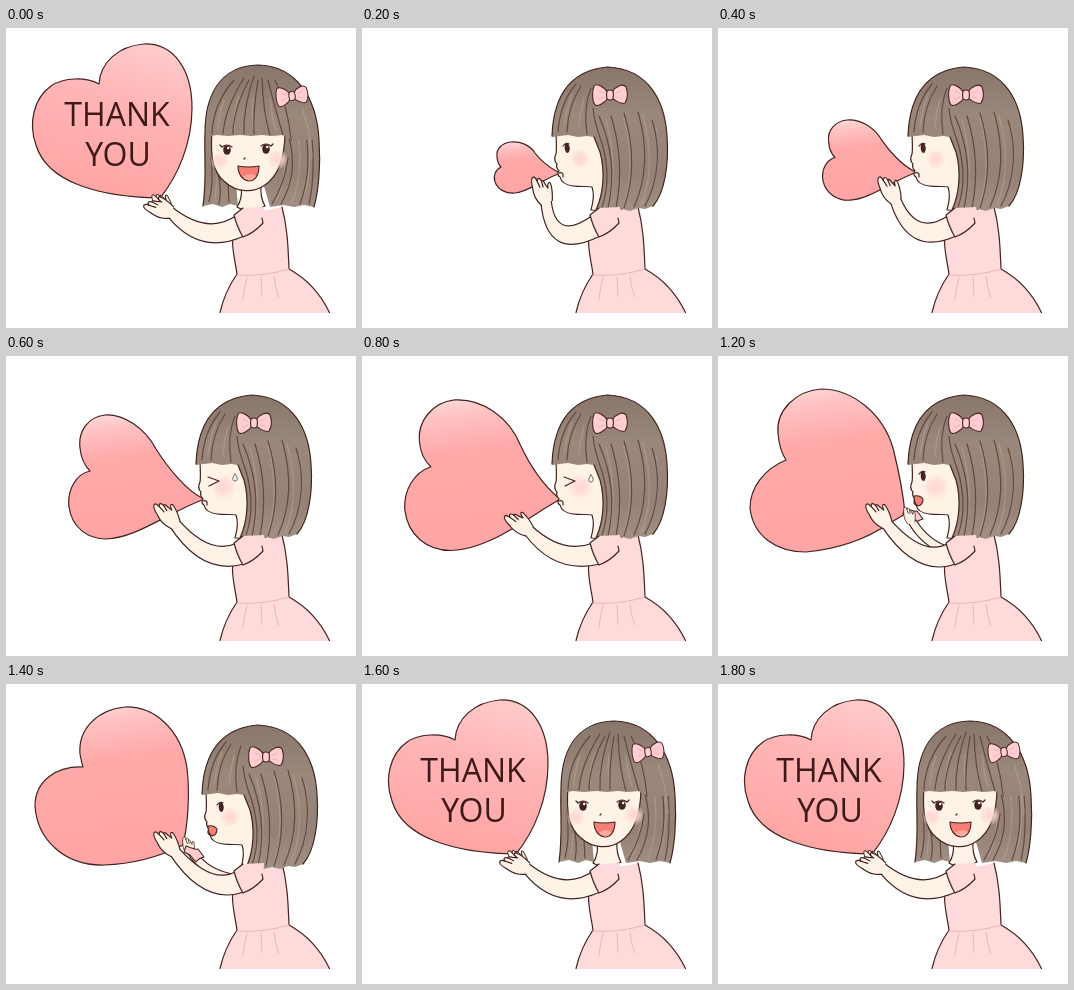
An HTML page that plays this animation: 350 px wide and 300 px high, repeating every 2000 ms.

```html
<!DOCTYPE html>
<html lang="en">
<head>
<meta charset="utf-8">
<title>Thank you</title>
<style>
html, body { margin: 0; width: 100%; height: 100%; overflow: hidden; background: #fff; }
svg { display: block; width: 350px; height: 300px; }
.pose { visibility: hidden; animation: one 2s step-end infinite; animation-delay: calc(var(--s) * 200ms - 2s); }
.pose.long { animation-name: three; }
@keyframes one { 0% { visibility: visible } 10%, 100% { visibility: hidden } }
@keyframes three { 0% { visibility: visible } 30%, 100% { visibility: hidden } }
path { stroke-linejoin: round; stroke-linecap: round; }
.ink { fill: none; stroke: #432320; stroke-width: 1.2; }
.skin { fill: #fff3e8; stroke: #432320; stroke-width: 1.2; }
.dress { fill: #ffdadb; stroke: #432320; stroke-width: 1.2; }
.bow { fill: #ffcdd2; stroke: #432320; stroke-width: 1.1; }
.hair { fill: url(#hair); }
.dark { fill: none; stroke: #64493f; stroke-width: 1.2; }
.light { fill: none; stroke: #b5a398; stroke-width: 1.6; opacity: .5; }
.fold { fill: none; stroke: #eeb4b8; stroke-width: 1; }
.eye { fill: #432320; }
.mouth { fill: #f67f74; stroke: #432320; stroke-width: 1.1; }
.drop { fill: #f4fbff; stroke: #66595a; stroke-width: .9; }
text { font: 32px "Open Sans", "Noto Sans", sans-serif; fill: #3d1a18; text-anchor: middle; }
</style>
</head>
<body>
<svg id="stage" viewBox="0 0 350 300"></svg>
<script>
const p = (cls, d) => `<path class="${cls}" d="${d}"/>`;
const move = (x, y, body) => `<g transform="translate(${x} ${y})">${body}</g>`;
const blush = (x, y, r) => `<circle cx="${x}" cy="${y}" r="${r}" fill="url(#blush)"/>`;

const mix = (a, b, t) => {
  const to = b.match(/\d+/g);
  let i = 0;
  return a.replace(/\d+/g, n => (+n + (to[i++] - n) * t).toFixed(1));
};

const small = 'M196 144C188 140 178 132 173 125C168 117 158 113 149 114C140 115 134 121 135 128C135 132 136 136 139 139C133 142 131 148 133 154C136 162 145 166 153 165C166 164 180 152 196 146';
const medium = 'M196 142C180 134 162 112 150 93C139 72 118 58 99 59C82 61 72 75 74 92C75 102 79 110 84 115C70 118 61 134 63 151C66 172 82 183 100 183C130 182 160 158 196 144';
const large = 'M197 142C183 128 172 112 162 88C150 56 120 36 90 38C65 41 49 62 51 83C52 95 57 104 63 109C44 116 34 135 35 155C38 182 58 199 85 199C125 198 160 168 197 144';
const freed = 'M187 158C185 134 181 116 175 92C165 58 135 33 103 33C77 35 58 55 60 77C61 90 64 98 68 104C46 113 32 132 32 152C35 180 58 196 88 196C120 193 150 182 172 167L187 158';
const turned = 'M177 161C182 140 184 110 181 84C175 45 148 22 119 23C90 26 72 46 74 70C75 76 76 80 77 83C50 82 29 97 29 122C31 155 58 182 98 181C128 180 155 172 177 161';
const upright = 'M154 170C172 148 186 115 186 80C186 42 168 15 138 16C112 18 94 35 93 56C80 49 58 49 45 58C28 70 22 95 30 117C41 154 92 169 154 170Z';

const heart = (d, fill = 'heart') => `<path d="${d}" fill="url(#${fill})" stroke="#432320" stroke-width="1.2"/>`;

// Hand points up from the wrist at 0,0
const hand = (x, y, turn, size = 1) => `<g transform="translate(${x} ${y}) rotate(${turn}) scale(${size})">` +
  p('skin', 'M-6 2C-9 -5 -9 -11 -7 -17C-6 -23 -4 -27 -2 -27C0 -27 0 -24 0 -22C2 -25 4 -24 4 -20C5 -21 6 -19 6 -16L7 -11C9 -17 12 -17 11 -12C10 -6 8 -2 6 2') +
  p('ink', 'M0 -22L0 -15M4 -20L3 -14') + '</g>';

// Tapered arm from the sleeve, bent towards ex,ey
const arm = (ex, ey, wx, wy, turn) => {
  const a = turn * Math.PI / 180, c = 5.5 * Math.cos(a), s = 5.5 * Math.sin(a);
  return p('skin', `M231 187Q${ex + 4} ${ey - 10} ${wx + c} ${wy + s}L${wx - c} ${wy - s}Q${ex - 4} ${ey + 10} 238 208Z`) +
    hand(wx, wy, turn);
};

const bow = p('bow', 'M-2 -2C-6 -9 -14 -12 -16 -9C-18 -4 -18 6 -15 10C-11 12 -5 7 -2 3Z') +
  p('bow', 'M2 -3C6 -9 13 -12 16 -8C18 -3 18 4 15 8C11 10 6 6 2 3Z') +
  p('bow', 'M-3 -4Q0 -6 3 -4Q4 0 3 4Q0 6 -3 4Q-4 0 -3 -4Z') +
  p('fold', 'M-6 -2L-11 -4M-6 2L-11 4M6 -2L11 -4M6 2L11 3');

const dress =
  `<path d="M231 246C222 259 217 271 214 285L324 285C315 267 303 252 283 241Z" fill="#ffdadb"/>` +
  p('ink', 'M231 246C222 259 217 271 214 284.500M283 241C303 252 315 267 323.500 284.500') +
  `<path d="M234 181L228 196C224 212 229 232 231 247Q257 249 283 241C282 215 281 198 276 179Q255 185 234 181Z" fill="#ffdadb"/>` +
  p('ink', 'M228 200C224 214 229 232 231 246M283 241C282 215 281 198 276 179') +
  p('fold', 'M231 247Q257 249 283 241M241 250Q238 260 237 271M255 249L256 268M268 248Q269 260 273 269');
const sleeve = `<path d="M237 180L228 187Q231 199 237 209Q248 205 257 195L258 179Z" fill="#ffdadb"/>` +
  p('ink', 'M237 180L228 187Q231 199 237 209Q248 205 257 195L256 190');

const sideHair =
  p('hair', 'M190 109C191 82 198 43 246 39C288 41 303 75 305 108C307 135 303 165 291 178L283 181L276 180L268 183L260 181L252 183L244 181L234 183C242 165 243 142 238 124L232 109L225 108L216 109L206 107L198 108Z') +
  p('light', 'M244 92C252 120 253 150 247 178M262 90C270 120 270 150 262 179M281 88C290 120 290 150 279 177M210 66Q204 82 202 98M222 70Q218 85 217 99M294 100Q298 130 292 155') +
  p('dark', 'M231 80C232 92 235 102 240 115C247 140 246 162 240 179M237 88C250 118 253 150 246 180M249 88C259 120 260 150 254 180M262 85C272 118 273 148 262 180M276 84C285 115 286 148 272 179M290 92C299 118 297 152 283 178M219 58Q206 78 205 104M229 60Q221 80 225 106M214 56Q198 75 196 104') +
  p('ink', 'M190 108C191 82 198 43 246 39C288 41 303 75 305 108C307 135 303 165 291 178M232 109L238 124C243 142 242 165 234 182');
const sideFace = p('skin', 'M194 102C194 112 195 120 194 126C192 130 192 133 195 136C194 139 195 141 197 143C195 146 196 148 198 149C199 154 204 157 211 158C219 159 226 158 230 159C233 167 231 175 229 182L260 184L256 150L240 100Z');

const openEye = p('eye', 'M204 115C208 116 209 122 206 125C202 125 202 117 204 115Z') + p('ink', 'M201 118Q204 114 207 116');
const squint = p('ink', 'M202 121L213 125L203 130');
const pucker = p('ink', 'M197 145Q200 144 201 146L201 149');
const smile = p('mouth', 'M196 140Q202 139 205 143Q205 149 200 150Q196 148 196 140Z');
const drop = (x, y) => p('drop', `M${x} ${y - 4}c3 4 3 7 0 7c-3 0 -3 -3 0 -7Z`);

const side = (n, shape, face, arms, o = {}) => `<g class="pose" style="--s:${n}">` +
  heart(shape) + (o.back || '') +
  move(o.dx || 0, o.dy || 0, sideFace + blush(218, 131, o.cheek || 11) + face) + dress +
  move(o.dx || 0, o.dy || 0, sideHair) +
  move(o.bx || 248, o.by || 67, bow) + (o.sweat || '') + arms + sleeve + '</g>';

// Far arm holding the neck of the balloon
const backArm = (x, y) =>
  p('skin', `M${x - 3} ${y}Q${x + 9} ${y + 23} 232 202L232 191Q${x + 18} ${y + 19} ${x + 5} ${y - 2}Z`) +
  hand(x, y, -18, .6);
const knot = (x, y) => move(x, y, p('bow', 'M-7 -5C-2 -3 2 -1 5 -2L11 6Q6 7 3 11L-3 4L-9 1Z'));
const strain = squint + pucker;

const frontEye = (x, y, s) => `<ellipse class="eye" cx="${x}" cy="${y}" rx="3.8" ry="4.8"/>
  <circle cx="${x + 1.2}" cy="${y - 2}" r="1.2" fill="#fff"/>` +
  p('ink', `M${x - 5} ${y - 3}Q${x} ${y - 7} ${x + 5} ${y - 3}M${x + s * 5} ${y - 3}l${s * 2} -2`);

const front = `<g class="pose long" style="--s:8">` +
  heart(upright, 'bright') +
  `<text x="111" y="98">THANK</text><text x="112" y="138">YOU</text>` +
  dress +
  p('hair', 'M197 178C201 150 198 130 199 105C199 70 212 38 252 37C292 38 311 72 313 112C315 140 312 165 308 179L298 177L288 179L278 177L264 179L258 158L230 155L232 178L224 176L216 179L207 176Z') +
  p('light', 'M289 95C297 125 295 150 286 175M302 105Q307 140 298 168M279 130Q279 155 270 172M211 150L209 170') +
  p('dark', 'M283 110C290 135 286 157 275 176M297 90C305 125 302 155 294 176M305 100Q310 145 303 176M282 130Q279 155 266 176M205 130Q208 155 203 174M212 145Q216 160 213 176M222 155L223 174') +
  p('ink', 'M197 178C201 150 198 130 199 105C199 70 212 38 252 37C292 38 311 72 313 112C315 140 312 165 308 179') +
  p('skin', 'M235 158Q237 170 231 179Q244 187 259 178Q254 170 255 156Z') +
  p('skin', 'M206 103C204 128 207 145 219 154C231 165 248 165 259 157C272 148 279 130 279 103Z') +
  blush(214, 133, 10) + blush(271, 131, 11) +
  frontEye(221, 122, -1) + frontEye(260, 121, 1) +
  p('ink', 'M239 130l-1 1') +
  p('mouth', 'M232 138Q242 140 253 138C253 147 249 153 243 153C236 152 232 146 232 138Z') +
  `<path d="M237 149Q243 144 250 148Q247 152.500 243 152.500Q239 152 237 149Z" fill="#ffaa9f"/>` +
  p('hair', 'M200 109C199 70 212 38 252 38C290 39 308 70 309 112L283 111L277 107L266 108L256 107L245 108L234 107L222 108L211 107Z') +
  p('light', 'M218 72Q212 88 212 102M233 68Q227 86 228 102M247 70Q245 86 248 102M264 72Q266 90 270 102M296 80Q305 105 306 130') +
  p('dark', 'M228 52Q207 76 206 106M238 50Q219 80 217 106M243 52Q227 82 227 106M248 48Q237 80 238 106M252 52Q247 82 248 106M256 50Q257 84 264 107M262 52Q270 84 277 107M269 52Q282 78 285 112') +
  `<g transform="translate(286 68) rotate(-5) scale(.92)">${bow}</g>` +
  hand(162, 182, -42, .8) + arm(198, 218, 164, 184, -72) + sleeve +
  '</g>';

const defs = `<defs>
  <linearGradient id="heart" x1=".36" y1="0" x2=".5" y2="1">
    <stop offset="0" stop-color="#ffd6d6"/><stop offset=".1" stop-color="#ffc2c2"/>
    <stop offset=".34" stop-color="#ffa9a9"/><stop offset="1" stop-color="#ffa4a4"/>
  </linearGradient>
  <linearGradient id="bright" x1=".62" y1="0" x2=".38" y2="1">
    <stop offset="0" stop-color="#ffcaca"/><stop offset=".35" stop-color="#ffb5b5"/>
    <stop offset=".7" stop-color="#ffacac"/><stop offset="1" stop-color="#ffa4a3"/>
  </linearGradient>
  <linearGradient id="hair" gradientUnits="userSpaceOnUse" x1="0" y1="38" x2="0" y2="182">
    <stop offset="0" stop-color="#89766b"/><stop offset=".35" stop-color="#9b887c"/>
    <stop offset=".75" stop-color="#958175"/><stop offset="1" stop-color="#a28f84"/>
  </linearGradient>
  <radialGradient id="blush">
    <stop offset="0" stop-color="#ffd6d3"/><stop offset=".5" stop-color="#ffdad6" stop-opacity=".8"/>
    <stop offset="1" stop-color="#ffe4de" stop-opacity="0"/>
  </radialGradient>
</defs>`;

const blow = openEye + pucker;
const hold = arm(202, 212, 168, 167, -42);

document.getElementById('stage').innerHTML = defs + front +
  side(1, small, blow, arm(189, 225, 184, 173, -24)) +
  side(2, mix(small, medium, .4), blow, arm(194, 220, 177, 171, -32)) +
  side(3, medium, strain, arm(200, 210, 168, 167, -42), { cheek: 14, sweat: drop(229, 122) }) +
  side(4, mix(medium, large, .72), strain, arm(197, 209, 166, 174, -55), { cheek: 14, sweat: drop(229, 123) }) +
  side(5, large, strain, arm(195, 208, 165, 177, -62), { cheek: 14, sweat: drop(228, 125) + drop(238, 119) }) +
  side(6, freed, openEye + smile, hold, { back: knot(194, 157) + backArm(193, 166), cheek: 14 }) +
  side(7, turned, move(4, 1, openEye) + smile, hold,
    { back: backArm(184, 168) + knot(187, 167), dx: 6, dy: 2, bx: 260, by: 73 });
</script>
</body>
</html>
```
